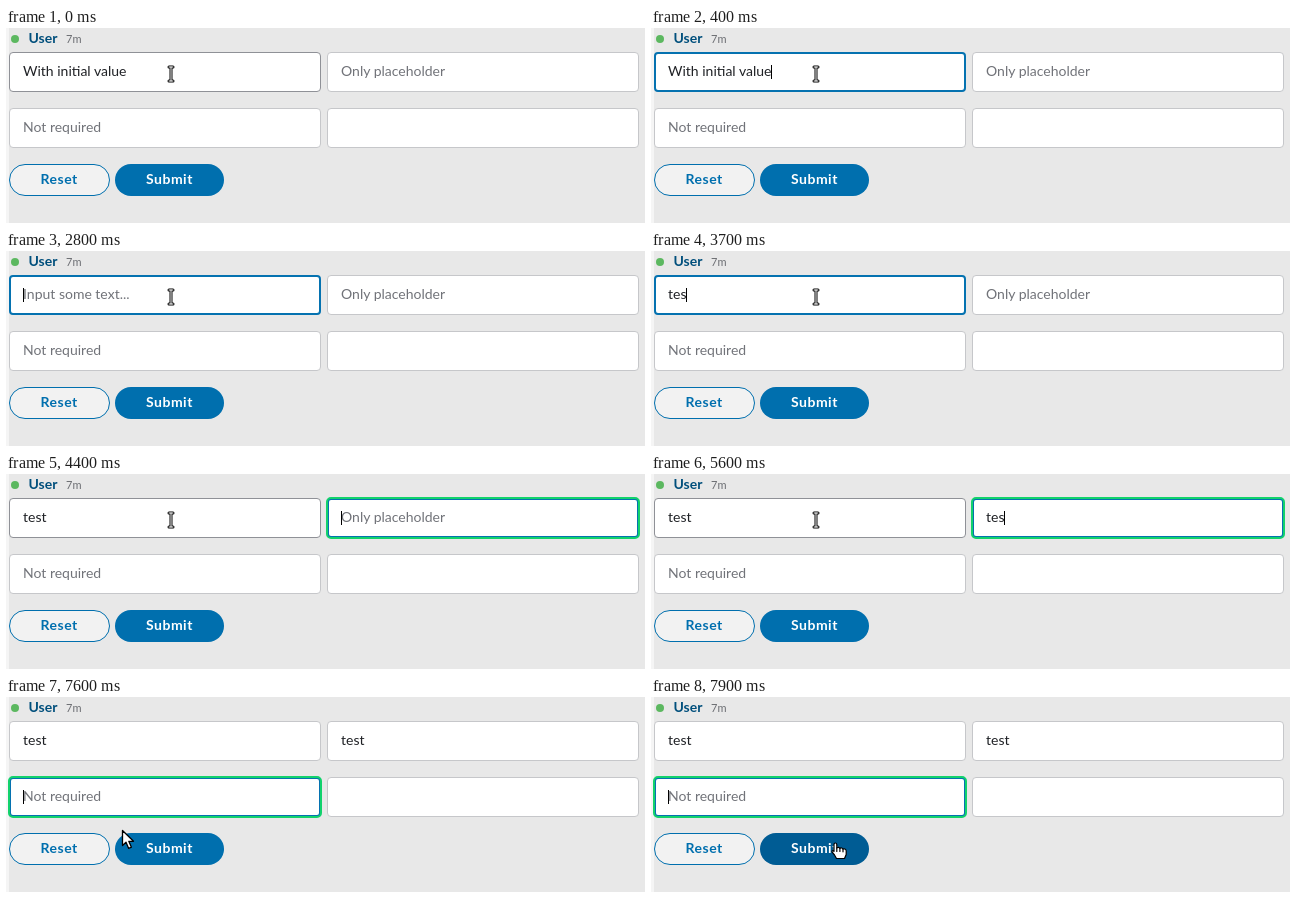
Animation, 639 px wide and 195 px high, one loop 8 s. Source, as an HTML page:

```html
<!DOCTYPE html>
<html lang="en">
<head>
<meta charset="utf-8">
<title>Form fields</title>
<style>
  html, body { margin: 0; width: 100%; height: 100%; overflow: hidden; background: #e8e8e8; }
  svg { display: block; }
  text { font: 14px Lato, sans-serif; fill: #1f2125; white-space: pre; }
  .bold { font-weight: 700; }
  .button { letter-spacing: .5px; }
  .hint { fill: #717379; }
  .box { fill: #fff; stroke: #c6c7ca; }
  .box.hover { stroke: #8f9197; }
  .box.focus { stroke: #0572b0; stroke-width: 2; }
  .ring { fill: none; stroke: #12d26c; stroke-width: 2; }
  .caret { fill: #000; }
  .pointer path { stroke-linejoin: round; stroke-linecap: round; }
</style>
</head>
<body>
<svg id="stage" width="639" height="195" viewBox="0 0 639 195">
  <rect width="639" height="195" fill="#e8e8e8"/>
  <rect width="3" height="195" fill="#f5f5f5"/>
  <circle cx="9" cy="11" r="4" fill="#5cb860"/>
  <text class="bold" x="22.5" y="15" style="fill:#004f7c">User</text>
  <text x="60" y="15" style="font-size:11px;fill:#6b6d72">7m</text>
  <g id="fields"></g>
  <rect x="3.5" y="136.5" width="100" height="31" rx="15.5" fill="#fff" fill-opacity=".4" stroke="#006fae"/>
  <text class="bold button" x="34.5" y="156" style="fill:#006fae">Reset</text>
  <rect id="submit" x="109" y="136" width="109" height="32" rx="16"/>
  <text class="bold button" x="140" y="156" style="fill:#fff">Submit</text>
  <g id="beam" class="pointer" fill="none">
    <path d="M-2-7H2M0-7V7M-2 7H2" stroke="#000" stroke-width="3"/>
    <path d="M-2-7H2M0-7V7M-2 7H2" stroke="#fff" stroke-width="1"/>
  </g>
  <g id="arrow" class="pointer">
    <path d="M.5.5V15.5L4 12.3 6.7 18.4 9.4 17.2 6.8 11.3H11.5Z" fill="#fff" stroke="#000" stroke-width="1.3"/>
  </g>
  <g id="hand" class="pointer" stroke="#000" stroke-width="1.2">
    <path d="M-5-5.5C-5-7.5-2.4-7.5-2.2-5.5V-2C-1.5-3 .5-2.8.9-1.6 1.8-2.4 3.6-2 4-.9 5-1.6 7-1 7.2.8V4.5L5.5 8.5H-2.5L-4.5 5-6.8 2.2C-7.6.6-6 .2-5 1.4Z" fill="#fff"/>
    <path d="M-2.2-2V1.5M.9-1.6V1.5M4-.9V1.8" fill="none"/>
  </g>
</svg>
<script>
const LOOP = 8000;
const $ = id => document.getElementById(id);

function add(parent, tag, attrs, text = '') {
  const el = document.createElementNS('http://www.w3.org/2000/svg', tag);
  for (const key in attrs) el.setAttribute(key, attrs[key]);
  el.textContent = text;
  return parent.appendChild(el);
}

function makeField(x, y) {
  const g = add($('fields'), 'g', { transform: `translate(${x} ${y})` });
  return {
    box: add(g, 'rect', {}),
    ring: add(g, 'rect', { class: 'ring', width: 312, height: 40, rx: 4 }),
    text: add(g, 'text', { x: 14, y: 24 }),
    caret: add(g, 'rect', { class: 'caret', y: 13, width: 1, height: 14 })
  };
}

const fields = [[3, 24], [321, 24], [3, 80], [321, 80]].map(p => makeField(...p));
const hints = ['Input some text...', 'Only placeholder', 'Not required', ''];

const between = (t, spans) => spans.some(([a, b]) => t >= a && t < b);
const typed = (t, times) => 'test'.slice(0, times.filter(s => t >= s).length);
const show = (el, on) => el.setAttribute('visibility', on ? 'visible' : 'hidden');

// Typed one at a time, after holding backspace clears three letters per step
function firstValue(t) {
  const value = 'With initial value';
  if (t < 1200) return value;
  if (t < 2200) return value.slice(0, 17 - 3 * Math.max(0, Math.floor(t / 100) - 16));
  return typed(t, [3500, 3600, 3700, 3900]);
}

function drawField(i, value, { focus, ring, hover, caret }) {
  const { box, ring: outline, text, caret: bar } = fields[i];
  const inset = focus ? 1 : .5;
  const attrs = {
    class: 'box' + (focus ? ' focus' : hover ? ' hover' : ''),
    x: inset, y: inset, width: 312 - 2 * inset, height: 40 - 2 * inset, rx: 4 - inset
  };
  for (const key in attrs) box.setAttribute(key, attrs[key]);
  show(outline, ring);
  text.textContent = value || hints[i];
  text.setAttribute('class', value ? '' : 'hint');
  const width = value ? text.getComputedTextLength() : 0;
  bar.setAttribute('x', 14 + Math.floor(width + .05));
  show(bar, caret);
}

// Pointer stops, one per 100 ms from 7400
const stops = [
  ['arrow', 150, 70], ['beam', 132, 106], ['arrow', 116, 133],
  ['hand', 141, 148], ['hand', 168, 152], ['hand', 188, 153]
];

function draw(t) {
  const active = t < 400 ? -1 : t < 4400 ? 0 : t < 6300 ? 1 : 2;
  const caretOn = between(t, [[400, 1000], [1600, 2200], [2800, 3400], [3500, 5000], [5300, 6900], [7500, LOOP]]);
  const values = [firstValue(t), typed(t, [5300, 5400, 5600, 5700]), '', ''];
  values.forEach((value, i) => drawField(i, value, {
    focus: i === active,
    ring: i === active && i > 0,
    hover: i === 0 && t < 7400,
    caret: i === active && caretOn
  }));

  const [kind, x, y] = t < 7400 ? ['beam', 165, 46] : stops[Math.floor((t - 7400) / 100)];
  for (const id of ['beam', 'arrow', 'hand']) show($(id), id === kind);
  $(kind).setAttribute('transform', `translate(${x} ${y})`);
  $('submit').setAttribute('fill', kind === 'hand' ? '#005c94' : '#006fae');
}

const start = performance.now();
function tick() {
  draw((performance.now() - start) % LOOP);
  requestAnimationFrame(tick);
}
tick();
</script>
</body>
</html>
```
